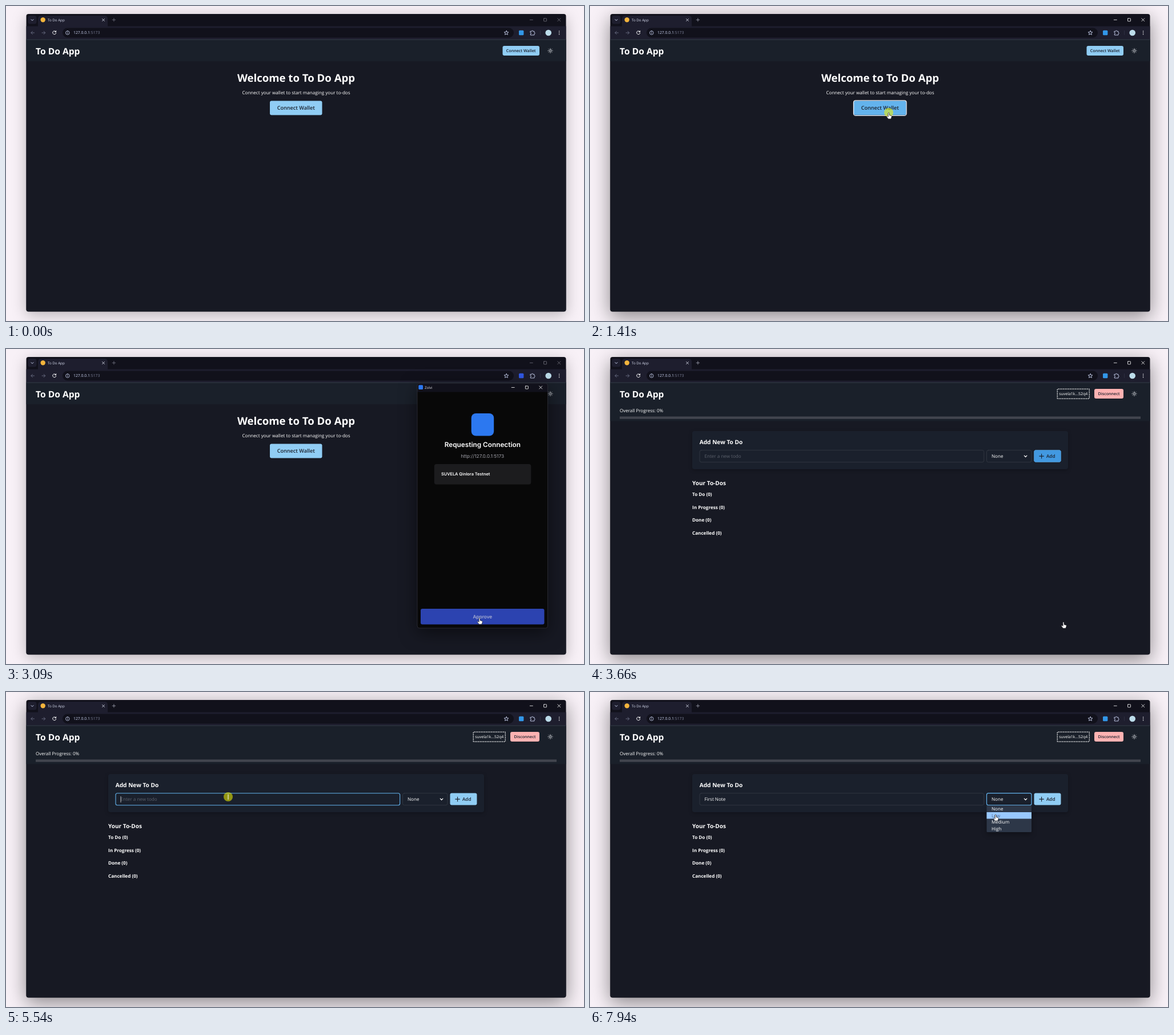
An HTML page with a canvas for the animation above (8 s loop, 1012 by 553 pixels).

```html
<!DOCTYPE html>
<html lang="en">
<head>
<meta charset="utf-8">
<title>To Do App</title>
<style>
html, body { margin: 0; width: 100%; height: 100%; overflow: hidden; background: #f8f1f7; }
canvas { display: block; }
</style>
</head>
<body>
<canvas id="stage" width="1012" height="553"></canvas>
<script>
const ctx = document.getElementById('stage').getContext('2d');
ctx.textRendering = 'geometricPrecision';
ctx.lineCap = ctx.lineJoin = 'round';

const LOOP = 8000;
const SANS = '"Open Sans", "Noto Sans", sans-serif';
const INTER = 'Inter, sans-serif';
const DARK = '#1a202c', SKY = '#90cdf4', SKY_HOVER = '#63b3ed', WHITE = '#fff';

const T = {
  press: 1340, connecting: 1760, blur: 2300, popupOpen: 2480, popupMove: 2680,
  approve: 3330, popupClose: 3450, connected: 3540,
  focusInput: 5420, type: 5830, keyGap: 74, select: 7470, menu: 7530, hoverLow: 7810
};
const NOTE = 'First Note';

// time, x, y of the pointer tip
const PATH = [
  [60, 911, 511], [800, 539, 223], [1100, 523, 187], [1700, 523, 187], [2300, 526, 188],
  [2650, 526, 188], [3050, 829, 472], [3450, 829, 472], [3600, 829, 479], [4150, 829, 481],
  [4930, 492, 222], [5380, 389, 184], [6640, 389, 184], [7380, 706, 190], [7760, 707, 194],
  [7880, 710, 215], [8000, 710, 215]
];

const ramp = (t, a, b) => Math.min(1, Math.max(0, (t - a) / (b - a)));
const between = (t, a, b) => t >= a && t < b;
const inside = (p, x, y, w, h) => p.x >= x && p.x <= x + w && p.y >= y && p.y <= y + h;

function box(x, y, w, h, r, fill, stroke, lineWidth = 1) {
  ctx.beginPath();
  ctx.roundRect(x, y, w, h, r);
  if (fill) { ctx.fillStyle = fill; ctx.fill(); }
  if (stroke) { ctx.strokeStyle = stroke; ctx.lineWidth = lineWidth; ctx.stroke(); }
}

function shadowBox(x, y, w, h, r, fill, alpha, blur, dy) {
  ctx.save();
  ctx.shadowColor = `rgba(0,0,0,${alpha})`;
  ctx.shadowBlur = blur;
  ctx.shadowOffsetY = dy;
  box(x, y, w, h, r, fill);
  ctx.restore();
}

function dot(x, y, r, fill, stroke, lineWidth = 1) {
  box(x - r, y - r, 2 * r, 2 * r, r, fill, stroke, lineWidth);
}

function path(d, stroke, lineWidth = 1, fill) {
  const p = new Path2D(d);
  if (fill) { ctx.fillStyle = fill; ctx.fill(p); }
  if (stroke) { ctx.strokeStyle = stroke; ctx.lineWidth = lineWidth; ctx.stroke(p); }
}

// y is the middle of the capital letters
function text(str, x, y, size, color = WHITE, weight = 400, align = 'left', family = SANS) {
  ctx.font = `${weight} ${size}px ${family}`;
  ctx.textAlign = align;
  ctx.fillStyle = color;
  ctx.fillText(str, x, y + size * 0.357);
  return ctx.measureText(str).width;
}

function withAlpha(alpha, draw) {
  ctx.save();
  ctx.globalAlpha = alpha;
  draw();
  ctx.restore();
}

function windowButtons(x, y, color) {
  path(`M${x - 2.5} ${y}h5M${x + 46} ${y - 2.5}l5 5m0 -5l-5 5`, color, 0.8);
  box(x + 21.7, y - 2.5, 5, 5, 0.6, null, color, 0.8);
}

function star(x, y, r) {
  ctx.beginPath();
  for (let i = 0; i < 10; i++) {
    const a = i * Math.PI / 5 - Math.PI / 2, d = i % 2 ? r * 0.45 : r;
    ctx.lineTo(x + d * Math.cos(a), y + d * Math.sin(a));
  }
  ctx.closePath();
  ctx.strokeStyle = '#cdd6f4';
  ctx.lineWidth = 0.9;
  ctx.stroke();
}

function sun(x, y) {
  dot(x, y, 1.8, null, '#e4e6ea', 0.9);
  for (let i = 0; i < 8; i++) {
    const c = Math.cos(i * Math.PI / 4), s = Math.sin(i * Math.PI / 4);
    path(`M${x + 3.2 * c} ${y + 3.2 * s}L${x + 4.1 * c} ${y + 4.1 * s}`, '#e4e6ea', 0.8);
  }
}

function browser(t, focused) {
  const dim = focused ? WHITE : '#73737e', light = '#cdd6f4', muted = '#6c7086';
  shadowBox(35.5, 14, 945, 522.5, 4, '#11111b', focused ? 0.45 : 0.26, focused ? 34 : 26, focused ? 9 : 6);
  ctx.save();
  ctx.beginPath();
  ctx.roundRect(35.5, 14, 945, 522.5, 4);
  ctx.clip();

  box(38.5, 17, 15, 14.5, 4, '#1e1e2e');
  path('M44 23.6l2 2l2 -2', light, 1);
  box(56, 17, 122, 26, 5, '#1e1e2e');
  dot(64.7, 24.3, 4.2, '#f2b43c');
  text('To Do App', 73, 24.6, 6.2, '#d9def0');
  path('M168.6 22.6l3.8 3.8m0 -3.8l-3.8 3.8', '#e2e6f4', 0.9);
  path('M186.2 24.3h5.4m-2.7 -2.7v5.4', focused ? '#a6a8b8' : '#777987', 0.8);
  windowButtons(919.8, 24.3, dim);

  box(35, 35.5, 946, 23.5, 0, '#1e1e2e');
  path('M49.5 47h-5.6m2.5 -2.6l-2.6 2.6l2.6 2.6M63 47h5.6m-2.5 -2.6l2.6 2.6l-2.6 2.6', muted, 0.9);
  path('M87.3 45.2a3 3 0 1 0 .4 2.2M87.6 43.6v2h-2', WHITE, 1);
  box(99, 38.5, 790, 17, 8.5, '#11111b');
  dot(107.8, 47, 3.3, null, light, 0.8);
  path('M107.8 46.8v1.7M107.8 45.3v.1', light, 0.8);
  const w = text('127.0.0.1', 118, 47, 6.85, light);
  text(':5173', 118 + w, 47, 6.85, '#7f849c');
  star(876, 47.2, 4);
  box(898, 42.8, 8.4, 8.4, 1.5, between(t, T.popupMove, T.popupClose) ? '#3159e6' : '#3297e8');
  path('M918.3 44.4h2.1a1.2 1.2 0 0 1 2.4 0h2.1v2.1a1.2 1.2 0 0 1 0 2.4v2.1h-6.6v-2.1a1.2 1.2 0 0 0 0 -2.4z', light, 0.9);
  path('M935.5 43.5v7', '#34364a', 0.7);
  dot(949.7, 47, 5.3, '#bcdcea');
  for (let i = -1; i < 2; i++) dot(968.6, 47 + i * 2.8, 0.8, WHITE);
  box(35, 58.5, 946, 478, 0, '#171923');
}

function welcomePage(t, pointer) {
  const hover = t < T.popupMove && inside(pointer, 462, 166, 92, 27);
  text('Welcome to To Do App', 508, 126.7, 18.6, WHITE, 700, 'center');
  text('Connect your wallet to start managing your to-dos', 508, 152.2, 8.1, WHITE, 400, 'center');
  box(462, 166.5, 91.5, 25, 3, hover ? SKY_HOVER : SKY);
  if (between(t, T.press, T.blur)) box(461.5, 165.8, 92.5, 26.6, 3.5, null, '#f4f8ff', 1.3);
  text('Connect Wallet', 507.8, 179, 9.1, DARK, 600, 'center');

  if (t < T.connecting) {
    box(869.5, 70, 64.5, 17, 3, SKY);
    text('Connect Wallet', 901.7, 78.6, 7.15, DARK, 600, 'center');
  } else {
    box(870, 70, 64, 17, 3, '#49657b');
    const mid = (90 + (t - 2610) * 0.8) * Math.PI / 180;
    ctx.beginPath();
    ctx.arc(880.7, 78.4, 3.6, mid - 1.25, mid + 1.25);
    ctx.strokeStyle = DARK;
    ctx.lineWidth = 1;
    ctx.stroke();
    text('Connecting', 889, 78.6, 7.1, '#202b38', 600);
  }
}

function todoPage(t, pointer) {
  text('Overall Progress: 0%', 52, 108.2, 8, WHITE);
  box(52, 118.6, 912, 4.2, 0, '#42454e');
  ctx.save();
  ctx.setLineDash([1.5, 1.5]);
  ctx.lineCap = 'butt';
  box(818.3, 70.3, 56, 17, 1, null, WHITE, 1.5);
  ctx.restore();
  text('suvela1k...52q4', 846.2, 78.8, 6.95, WHITE, 400, 'center');
  box(883, 70, 51, 17, 3, '#feb2b2');
  text('Disconnect', 908.5, 78.6, 7.1, DARK, 600, 'center');

  shadowBox(179, 144, 658, 67, 4, DARK, 0.25, 6, 2);
  text('Add New To Do', 191.7, 163.3, 10.15, WHITE, 700);

  const inputOn = between(t, T.focusInput, T.select);
  const line = '#363b46';
  box(192, 177.7, 497.7, 21, 3, null, inputOn ? SKY_HOVER : line, inputOn ? 1.1 : 0.8);
  const keys = Math.max(0, Math.min(NOTE.length, Math.floor((t - T.type) / T.keyGap) + 1));
  const w = keys ? text(NOTE.slice(0, keys), 200.5, 188.6, 8.1)
                 : (text('Enter a new todo', 200.5, 188.6, 8.1, '#5c616c'), 0);
  const lastKey = keys ? T.type + (keys - 1) * T.keyGap : T.focusInput;
  if (inputOn && Math.floor((t - lastKey) / 500) % 2 === 0) {
    path(`M${201 + w} 183.5v10`, WHITE, 0.7);
  }

  const selectOn = t >= T.select;
  box(694.5, 177.7, 78.5, 21, 3, null, selectOn ? SKY_HOVER : line, selectOn ? 1.2 : 0.8);
  text('None', 703, 188.4, 8.1);
  path('M760.3 187.2l2.3 2.3l2.3 -2.3', WHITE, 1.2);

  box(777.5, 177.5, 47, 21, 3, SKY);
  withAlpha(1 - ramp(t, 3680, 3880), () => box(777.5, 177.5, 47, 21, 3, '#4299e1'));
  path('M786.8 188.1h7.6m-3.8 -3.8v7.6', DARK, 1.1);
  text('Add', 799, 188.4, 8.1, DARK, 600);

  text('Your To-Dos', 179, 235, 10.05, WHITE, 700);
  ['To Do', 'In Progress', 'Done', 'Cancelled'].forEach((name, i) =>
    text(`${name} (0)`, 179, 254.8 + i * 22.8, 8.15, WHITE, 700));

  if (t >= T.menu) {
    shadowBox(694.5, 199, 78.5, 47, 1.5, '#2d3748', 0.3, 10, 4);
    const active = t < T.hoverLow ? 0 : 1;
    ['None', 'Low', 'Medium', 'High'].forEach((name, i) => {
      const y = 199.4 + i * 11.6;
      if (i === active) box(694.5, y, 78.5, 11.6, 0, '#99c8ff');
      text(name, 703, y + 5.9, 8.1, i === active ? '#4f6a90' : WHITE);
    });
  }
}

function popup(t, pointer) {
  const x = t < T.popupMove ? 1015 : 720, mid = x + 114.3;
  const hover = inside(pointer, x + 6, 456, 216, 28);
  shadowBox(x, 60, 228.5, 430, 4, '#080808', 0.5, 30, 8);
  box(x, 60, 228.5, 15.5, [4, 4, 0, 0], '#11111b');
  box(x, 60, 228.5, 430, 4, null, '#30303a', 0.8);
  box(x + 2.3, 63.2, 7.8, 7.8, 1.5, '#2c78f0');
  text('Zolvi', x + 13, 67.4, 6.1, '#e8e8ee');
  windowButtons(x + 167.7, 67.5, WHITE);
  box(x + 94.7, 113, 39.5, 39.5, 8, '#2c78f0');
  text('Requesting Connection', mid, 168, 11.8, WHITE, 600, 'center', INTER);
  text('http://127.0.0.1:5173', mid, 188, 8.3, '#a3a3ab', 400, 'center', INTER);
  box(x + 29.8, 202, 169.5, 35.7, 4, '#1c1c1e');
  text('SUVELA Qinlora Testnet', x + 42, 219.7, 7.35, WHITE, 600, 'left', INTER);
  box(x + 6, 456, 216.5, 27.5, 3, hover ? '#2c43b0' : '#3c56e0');
  text('Approve', mid, 469.8, 8.4, hover ? '#b4b9d6' : WHITE, 500, 'center', INTER);
}

function pointerAt(t) {
  let i = 1;
  while (i < PATH.length - 1 && t > PATH[i][0]) i++;
  const [t0, x0, y0] = PATH[i - 1], [t1, x1, y1] = PATH[i];
  const p = ramp(t, t0, t1), e = p * p * (3 - 2 * p);
  return { x: x0 + (x1 - x0) * e, y: y0 + (y1 - y0) * e };
}

function pointerKind(t, p) {
  if (t < T.connected) {
    const onApprove = between(t, T.popupMove, T.connected) && inside(p, 726, 456, 216, 28);
    const onConnect = t < T.popupMove && inside(p, 462, 166, 92, 27);
    return onApprove || onConnect ? 'hand' : 'arrow';
  }
  if (t < 3720 || t >= T.hoverLow) return 'hand';
  return inside(p, 192, 177, 498, 22) ? 'beam' : 'arrow';
}

function drawPointer(t, p) {
  const pressed = [T.press, T.approve, T.focusInput, T.select].some(at => between(t, at, at + 180));
  if (pressed) dot(p.x, p.y, 8, 'rgba(245,245,0,.55)');
  ctx.save();
  ctx.translate(p.x, p.y);
  const kind = pointerKind(t, p);
  if (kind === 'hand') {
    path('M-1 1Q0 -.8 1 1V4.6L4.6 5.6Q5.4 6 5.2 7.4L4 11.2H-.8L-3.6 7.4Q-3.6 5.8 -2.2 6.2L-1 7.2Z', '#15151c', 0.7, WHITE);
  } else if (kind === 'beam') {
    path('M0 -4v8.5', WHITE, 1);
  } else {
    path('M0 0V10.2L2.4 8L4 11.8L5.6 11.1L4 7.4H7.3Z', '#15151c', 0.6, WHITE);
  }
  ctx.restore();
}

function render(t) {
  const pointer = pointerAt(t);
  const focused = between(t, T.press, T.blur) || t >= T.popupClose;
  const connected = t >= T.connected;
  ctx.fillStyle = '#f8f1f7';
  ctx.fillRect(0, 0, 1012, 553);
  browser(t, focused);
  box(35, 59, 946, connected ? 67.5 : 38, 0, '#1a202a');
  path('M35 59h946', '#38424e', 0.9);
  text('To Do App', 52, 79.5, 15.6, WHITE, 700);
  sun(953, 78.6);
  (connected ? todoPage : welcomePage)(t, pointer);
  ctx.restore();
  if (between(t, T.popupOpen, T.popupClose)) popup(t, pointer);
  if (t >= 60) drawPointer(t, pointer);
}

function tick() {
  render(performance.now() % LOOP);
  requestAnimationFrame(tick);
}
tick();
</script>
</body>
</html>
```
